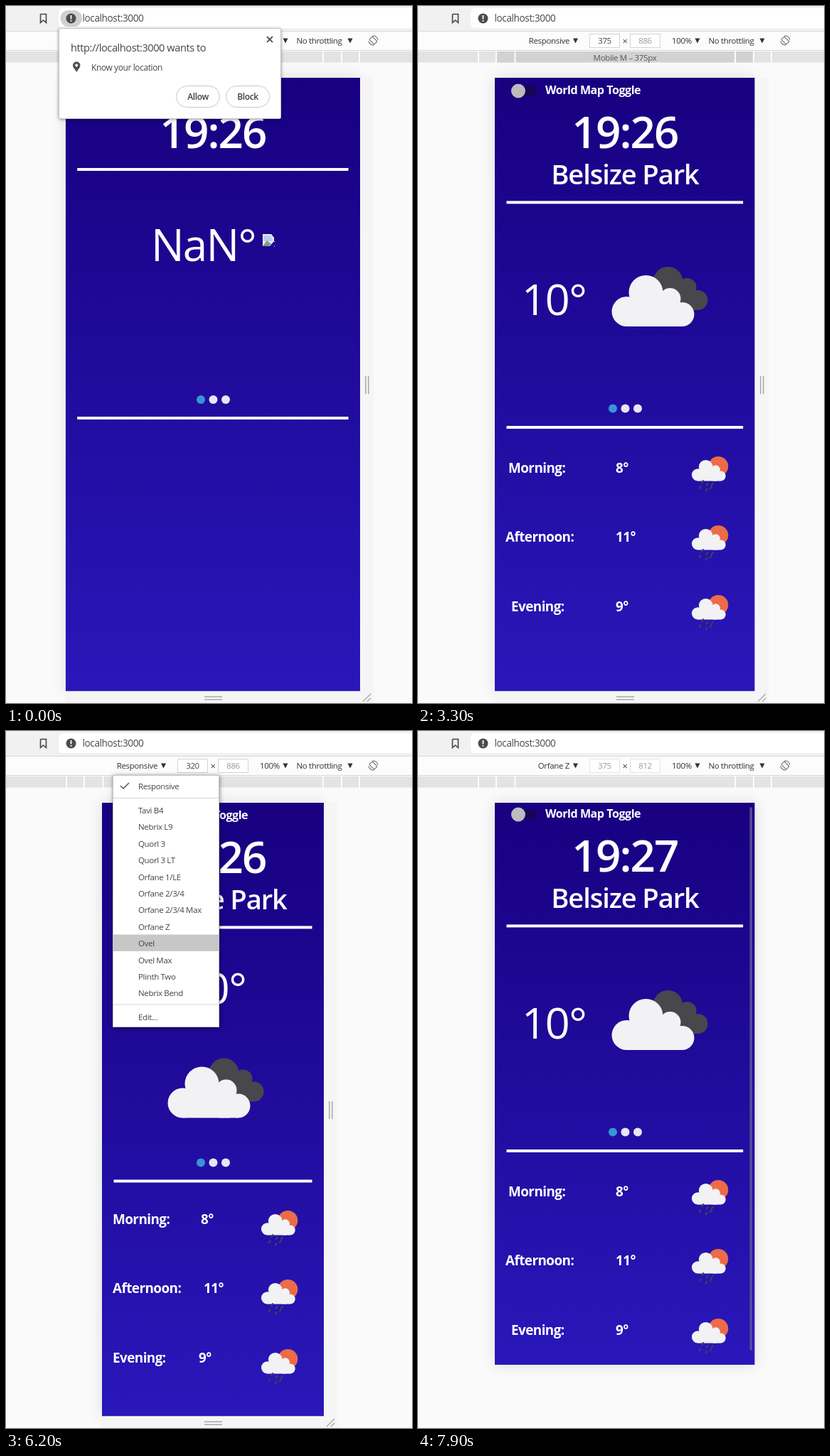
Animation of 571 by 981 pixels, one loop 8 s. Source, as an HTML page with a canvas:

```html
<!DOCTYPE html>
<html lang="en">
<head>
<meta charset="utf-8">
<title>Responsive weather page</title>
<style>
html, body { margin: 0; width: 100%; height: 100%; overflow: hidden; background: #fafafa; }
canvas { display: block; }
</style>
</head>
<body>
<canvas id="stage" width="571" height="981"></canvas>
<script>
const ctx = document.getElementById('stage').getContext('2d');
const LOOP = 8000;
const FONT = '"Open Sans", "Noto Sans", sans-serif';
const TOP = 101, TALL = 863.5, SHORT = 791;

const DEVICES = ['Tavi B4', 'Nebrix L9', 'Quorl 3', 'Quorl 3 LT', 'Orfane 1/LE', 'Orfane 2/3/4',
  'Orfane 2/3/4 Max', 'Orfane Z', 'Ovel', 'Ovel Max', 'Plinth Two', 'Nebrix Bend'];
const PICKED = 7;
const FORECAST = [['Morning:', '8°'], ['Afternoon:', '11°'], ['Evening:', '9°']];

const LAYOUTS = {
  empty: { x: 83.7, w: 414.3, css: 425, rules: [230, 580], dots: 554 },
  wide: { x: 83.7, w: 414.3, css: 425, rules: [276.4, 627], dots: 600.7, temp: [190, 456], cloud: [273.5, 388.5],
    size: 22.8, labels: [104, 98, 108], temps: [280, 281, 280], rows: [699, 808, 913],
    icons: [400, 402, 400], lift: 28, k: 1 },
  mid: { x: 108, w: 365.7, css: 375, rules: [276.4, 593], dots: 566.5, temp: [191, 435], cloud: [272.5, 367],
    size: 18.9, labels: [127, 123, 131], temps: [278, 278, 278], rows: [657, 754, 852],
    icons: [385, 385, 385], lift: 23, k: 0.9 },
  slim: { x: 135, w: 312, css: 320, rules: [276.4, 633.5], dots: 607.5, temp: [292, 384], cloud: [227.5, 460.5],
    size: 18.9, labels: [150, 150, 150], temps: [274, 278, 271], rows: [694, 791, 889],
    icons: [359, 359, 359], lift: 19, k: 0.9 }
};

// Moments of the recorded session, in ms
const AT = { allow: 800, loaded: 1000, hoverMid: 2400, mid: 2800, hoverSlim: 3700, slim: 3900,
  leave: 4900, menu: 5600, pick: 6600, relayout: 6900, scroll: 7500 };

function rect(x, y, w, h, color) {
  ctx.fillStyle = color;
  ctx.fillRect(x, y, w, h);
}

function circle(x, y, r, color) {
  ctx.fillStyle = color;
  ctx.beginPath();
  ctx.arc(x, y, r, 0, Math.PI * 2);
  ctx.fill();
}

function round(x, y, w, h, r, fill, stroke) {
  ctx.beginPath();
  ctx.roundRect(x, y, w, h, r);
  if (fill) { ctx.fillStyle = fill; ctx.fill(); }
  if (stroke) { ctx.strokeStyle = stroke; ctx.lineWidth = 1; ctx.stroke(); }
}

function line(points, color, width) {
  ctx.strokeStyle = color;
  ctx.lineWidth = width;
  ctx.beginPath();
  points.forEach(([x, y], i) => i ? ctx.lineTo(x, y) : ctx.moveTo(x, y));
  ctx.stroke();
}

function polygon(points, color) {
  ctx.fillStyle = color;
  ctx.beginPath();
  points.forEach(([x, y]) => ctx.lineTo(x, y));
  ctx.fill();
}

function text(str, x, y, size, color = '#fff', weight = 400, align = 'left') {
  ctx.font = `${weight} ${size}px ${FONT}`;
  ctx.letterSpacing = `${-0.03 * size}px`;
  ctx.textAlign = align;
  ctx.fillStyle = color;
  ctx.fillText(str, x, y);
}

function shadowed(blur, alpha, dy, draw) {
  ctx.save();
  ctx.shadowColor = `rgba(0,0,0,${alpha})`;
  ctx.shadowBlur = blur;
  ctx.shadowOffsetY = dy;
  draw();
  ctx.restore();
}

function whiteCloud() {
  const color = '#f2f1f3';
  circle(21, 63, 21, color);
  circle(48, 36, 24, color);
  circle(82, 45, 15, color);
  circle(99, 67, 17, color);
  rect(21, 50, 66, 34, color);
  rect(72, 60, 27, 24, color);
}

function bigCloud([x, y]) {
  const dark = '#48474c';
  ctx.save();
  ctx.translate(x, y);
  circle(79, 21, 21, dark);
  circle(106, 29, 13, dark);
  circle(121, 47, 14, dark);
  rect(72, 28, 38, 33, dark);
  rect(100, 40, 21, 21, dark);
  whiteCloud();
  ctx.restore();
}

function rainIcon(x, y, k) {
  ctx.save();
  ctx.translate(x, y);
  ctx.scale(k, k);
  circle(41.5, 15.5, 15.5, '#ec6b48');
  ctx.save();
  ctx.scale(0.457, 0.457);
  whiteCloud();
  ctx.restore();
  ctx.lineCap = 'round';
  for (const [dx, dy] of [[18, 38], [25, 42], [33, 42], [14, 47], [24, 51], [31, 47]])
    line([[dx, dy], [dx - 2, dy + 3]], '#454052', 2.4);
  ctx.restore();
}

function arrow(x, y) {
  polygon([[x - 3.5, y - 3.5], [x + 3.5, y - 3.5], [x, y + 3.5]], '#333');
}

function browserBar(asking) {
  rect(0, 0, 571, 36, '#f1f1f1');
  round(74, 3, 520, 28, 6, '#fff');
  line([[48.5, 11.5], [56.5, 11.5], [56.5, 23.5], [52.5, 20], [48.5, 23.5], [48.5, 11.5]], '#444', 1.6);
  if (asking) round(76.5, 6, 30.5, 23, 11.5, '#d0d0d0');
  circle(91.5, 17.5, 7, '#4c4c4f');
  rect(90.6, 13, 1.8, 5.5, '#fff');
  rect(90.6, 20, 1.8, 1.8, '#fff');
  text('localhost:3000', 107.5, 22, 13.6, '#484848');
}

function rotateIcon(x, y) {
  ctx.save();
  ctx.translate(x, y);
  ctx.rotate(Math.PI / 4);
  round(-5, -3, 10, 6, 1, null, '#666');
  ctx.beginPath();
  ctx.arc(0, 0, 6.5, -2.6, -0.9);
  ctx.stroke();
  ctx.beginPath();
  ctx.arc(0, 0, 6.5, 0.55, 2.25);
  ctx.stroke();
  ctx.restore();
}

function toolbar(layout, picked) {
  rect(0, 36, 571, 27, '#fcfcfc');
  rect(0, 35, 571, 1, '#d8d8d8');
  rect(0, 62, 571, 1, '#d8d8d8');
  const size = 11.5;
  text(picked ? DEVICES[PICKED] : 'Responsive', 213, 53, size, '#333', 400, 'right');
  arrow(221.5, 49);
  const border = picked ? '#e4e4e4' : '#d4d4d4';
  round(241.5, 39.5, 42, 19, 0, '#fff', border);
  round(298.5, 39.5, 42, 19, 0, '#fff', border);
  text(picked ? '375' : String(layout.css), 262.5, 53, size, picked ? '#999' : '#444', 400, 'center');
  text('×', 291, 54, 13, '#444', 400, 'center');
  text(picked ? '812' : '886', 319.5, 53, size, '#999', 400, 'center');
  text('100%', 357, 53, size, '#333');
  arrow(393, 49);
  text('No throttling', 408.5, 53, size, '#333');
  arrow(484, 49);
  rotateIcon(516.5, 48.5);
}

function ruler(hover) {
  rect(0, 64, 571, 15.5, '#e3e3e3');
  if (hover === 'mid') rect(110, 64, 362, 15.5, '#d2d2d2');
  if (hover === 'slim') rect(137, 64, 309, 15.5, '#d2d2d2');
  for (const x of [84, 109, 135.5, 445, 471, 496]) rect(x, 63, 2, 17, '#fcfcfc');
  const label = { mid: 'Mobile M – 375px', slim: 'Mobile S – 320px' }[hover];
  if (label) text(label, 291, 76.5, 11.5, '#555', 400, 'center');
}

function handles({ x, w }) {
  const right = Math.round(x + w), grip = '#a9a9a9';
  rect(right, TOP, 19, 879, '#f5f5f5');
  rect(x, 964, w + 19, 17, '#f5f5f5');
  rect(right + 7, 521, 1.5, 25, grip);
  rect(right + 11, 521, 1.5, 25, grip);
  rect(279, 971.5, 25, 1.5, grip);
  rect(279, 975.5, 25, 1.5, grip);
  line([[right + 4, 979], [right + 15, 968]], grip, 1.5);
  line([[right + 10, 979], [right + 15, 974]], grip, 1.5);
}

function brokenImage() {
  polygon([[361, 321], [373, 321], [377, 326], [377, 338], [361, 338]], '#e9ebf3');
  polygon([[362, 323], [372, 323], [375, 328], [375, 331], [362, 331]], '#b9cdf0');
  polygon([[361, 338], [367, 330], [373, 335], [370, 338]], '#7e9c82');
  polygon([[371, 338], [377, 331], [377, 338]], '#200895');
  rect(377, 331, 1, 1, '#fff');
  rect(377, 337.5, 1, 1, '#fff');
}

function page(layout, height, clock, scroll, scrollbar) {
  const { x, w } = layout;
  ctx.save();
  ctx.beginPath();
  ctx.rect(x, TOP, w, height);
  ctx.clip();
  const sky = ctx.createLinearGradient(0, TOP, 0, TOP + height);
  sky.addColorStop(0, '#180080');
  sky.addColorStop(1, '#2917ba');
  rect(x, TOP, w, height, sky);

  ctx.translate(0, -scroll);
  round(x + 25, 113, 34, 13.5, 7, '#160653');
  circle(x + 33, 119.5, 10, '#bdbbbd');
  text('World Map Toggle', x + 71, 124, 16.1, '#fff', 700);
  text(clock, 291, 200, 62, '#fff', 600, 'center');
  for (const y of layout.rules) rect(x + 16.5, y - 2, w - 33, 4, '#fff');
  [274, 291.5, 309].forEach((cx, i) => circle(cx, layout.dots, 6, i ? '#e9e5f2' : '#3794d8'));

  if (layout.rows) {
    text('Belsize Park', 291, 251, 38.2, '#fff', 600, 'center');
    text('10°', ...layout.temp, 61, '#fff', 400, 'center');
    bigCloud(layout.cloud);
    FORECAST.forEach(([label, temp], i) => {
      const y = layout.rows[i];
      text(label, layout.labels[i], y, layout.size, '#fff', 700);
      text(temp, layout.temps[i], y, layout.size, '#fff', 700);
      rainIcon(layout.icons[i], y - layout.lift, layout.k);
    });
  } else {
    text('NaN°', 277.5, 359, 62, '#fff', 400, 'center');
    brokenImage();
  }
  ctx.restore();
  if (scrollbar) round(466.5, 107, 3.5, 765, 2, '#574b9a');
}

function permission() {
  shadowed(5, 0.45, 1, () => round(74.5, 31.5, 312, 127, 2, '#fff'));
  round(74.5, 31.5, 312, 127, 2, null, '#c4c4c4');
  text('http://localhost:3000 wants to', 91, 64, 14.6, '#444');
  line([[367, 43], [375, 51]], '#555', 1.8);
  line([[375, 43], [367, 51]], '#555', 1.8);
  polygon([[94.2, 85.5], [104.2, 85.5], [99.2, 93]], '#505050');
  circle(99.2, 83.5, 5.2, '#505050');
  circle(99.2, 83.5, 1.9, '#fff');
  text('Know your location', 120, 90.5, 11.9, '#444');
  [['Allow', 239], ['Block', 309]].forEach(([label, x]) => {
    round(x + 0.5, 112.5, 61, 30, 15, '#fff', '#c6c6c6');
    text(label, x + 31, 131.5, 12, '#3f3f46', 600, 'center');
  });
}

function hoveredDevice(t) {
  if (t < 5800) return -1;
  if (t < 6300) return Math.min(8, Math.floor((t - 5800) / 40));
  return PICKED;
}

function menu(t) {
  const size = 11.5, ink = '#444', step = 23.4;
  shadowed(6, 0.55, 1, () => rect(151, 62, 149, 355, '#fff'));
  round(150.5, 62.5, 149, 354, 0, null, '#c6c6c6');
  const hover = hoveredDevice(t);
  if (hover >= 0) rect(151, 286.5 + (hover - 8) * step, 148, 23.4, '#c7c7c7');
  line([[161, 77], [165, 81], [173, 73]], '#555', 1.5);
  text('Responsive', 186, 82, size, ink);
  rect(151, 94, 148, 1, '#d5d5d5');
  DEVICES.forEach((name, i) => text(name, 186, 116 + i * step, size, ink));
  rect(151, 384.5, 148, 1, '#d5d5d5');
  text('Edit...', 186, 407, size, ink);
}

function layoutAt(t) {
  if (t < AT.loaded) return LAYOUTS.empty;
  if (t < AT.mid) return LAYOUTS.wide;
  if (t < AT.slim || t >= AT.relayout) return LAYOUTS.mid;
  return LAYOUTS.slim;
}

function hoverAt(t) {
  if (t < AT.hoverMid || t >= AT.leave) return null;
  return t < AT.hoverSlim ? 'mid' : 'slim';
}

function draw(t) {
  const layout = layoutAt(t);
  const picked = t >= AT.pick;
  const frame = picked ? LAYOUTS.mid : layout;

  rect(0, 0, 571, 981, '#fafafa');
  shadowed(20, 0.12, 0, () => rect(frame.x, TOP, frame.w, picked ? SHORT : TALL, '#fff'));
  browserBar(t < AT.allow);
  toolbar(layout, picked);
  ruler(hoverAt(t));
  if (!picked) handles(layout);

  const height = t >= AT.relayout ? SHORT : TALL;
  const scroll = 2 * Math.min(1, Math.max(0, (t - AT.scroll) / 300));
  page(layout, height, picked ? '19:27' : '19:26', scroll, t >= AT.scroll);
  if (t < AT.allow) permission();
  if (t >= AT.menu && t < AT.pick) menu(t);
}

const start = performance.now();
function tick() {
  draw((performance.now() - start) % LOOP);
  requestAnimationFrame(tick);
}
tick();
</script>
</body>
</html>
```
